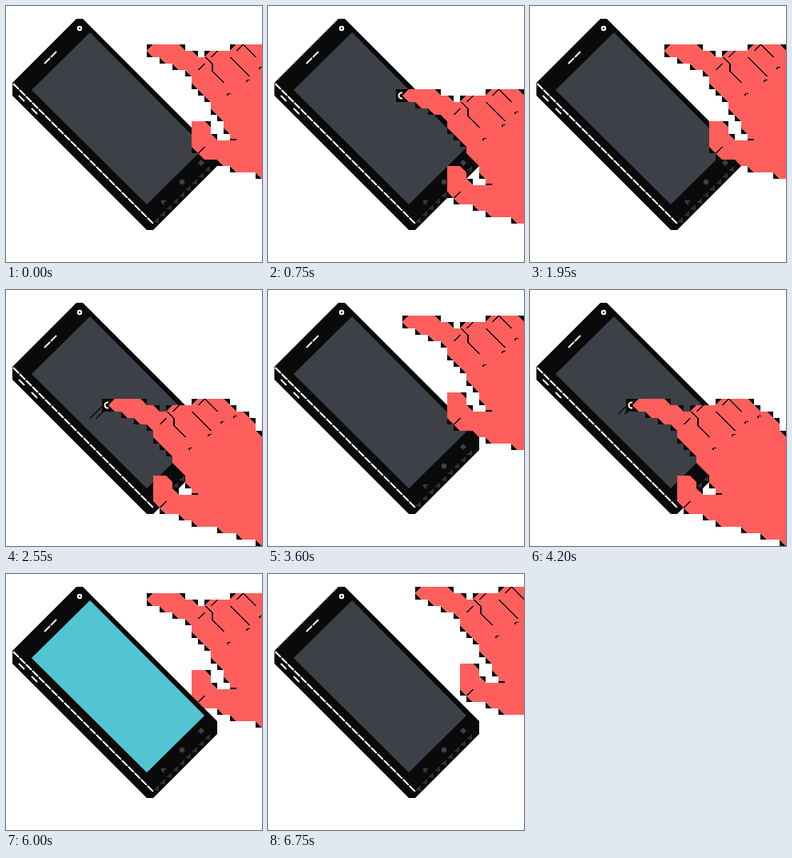
Write an HTML page with a canvas that moves like this. It is 320 px wide and 320 px high and loops after 6900 ms.

```html
<!DOCTYPE html>
<html lang="en">
<head>
<meta charset="utf-8">
<title>Swipe to unlock</title>
<style>
html, body { margin: 0; width: 100%; height: 100%; overflow: hidden; background: #fff; }
canvas { display: block; width: 320px; height: 320px; }
</style>
</head>
<body>
<canvas id="stage" width="320" height="320"></canvas>
<script>
const ctx = document.getElementById('stage').getContext('2d');
const STEP = 150, STEPS = 46, CELL = 8;
const BLACK = '#0a0a0a', GLASS = '#3d4047', TEAL = '#53c4d2', RED = '#ff5f5c', WHITE = '#fff';

function trace(points, closed) {
  ctx.beginPath();
  points.forEach(([x, y]) => ctx.lineTo(x, y));
  if (closed) ctx.closePath();
}
function poly(points, color) {
  trace(points, true);
  ctx.fillStyle = color;
  ctx.fill();
}
function line(x1, y1, x2, y2, color = BLACK) {
  trace([[x1, y1], [x2, y2]]);
  ctx.strokeStyle = color;
  ctx.lineWidth = 2;
  ctx.stroke();
}
function disc(x, y, r, color) {
  ctx.beginPath();
  ctx.arc(x, y, r, 0, Math.PI * 2);
  ctx.fillStyle = color;
  ctx.fill();
}
// Crisp thin stroke, one pixel row at a time.
function crease(x1, y1, x2, y2) {
  const n = Math.max(Math.abs(x2 - x1), Math.abs(y2 - y1));
  ctx.fillStyle = BLACK;
  for (let i = 0; i <= n; i++) {
    ctx.fillRect(Math.round(x1 + (x2 - x1) * i / n), Math.round(y1 + (y2 - y1) * i / n), 2, 1);
  }
}

// Joins key points by straight and 45 degree unit moves, in cells.
function walk(keys) {
  return keys.flatMap(([x, y], k) => {
    const [ex, ey] = keys[(k + 1) % keys.length];
    const dx = ex - x, dy = ey - y;
    const n = Math.max(Math.abs(dx), Math.abs(dy));
    const along = (d, i) => Math.sign(d) * Math.ceil(i * Math.abs(d) / n);
    return Array.from({ length: n }, (_, i) =>
      [(x + along(dx, i)) * CELL, (y + along(dy, i)) * CELL]);
  });
}

const HAND = walk([
  [0, 1], [1, 0], [5, 0], [6, 1], [7, 1], [8, 2], [9, 2], [10, 1], [13, 1], [14, 0],
  [18, 0], [20, 2], [21, 2], [23, 4], [23, 5], [27, 13], [27, 24],
  [15, 20], [14, 20], [10, 18], [9, 18], [7, 16], [7, 12], [9, 12],
  [10, 13], [10, 14], [11, 15], [13, 15], [13, 14], [12, 13], [12, 12],
  [10, 10], [10, 9], [7, 6], [7, 5], [1, 2]
]);

const SCREEN = [[105, 33], [248, 177], [176, 248], [32, 105]];

function drawPhone() {
  poly([[88, 16], [96, 16], [264, 184], [264, 200], [184, 280], [176, 280], [8, 112], [8, 96]], BLACK);
  poly(SCREEN, GLASS);

  ctx.setLineDash([10, 1.3]);
  line(9, 97, 184, 272, WHITE);
  ctx.setLineDash([]);
  for (const i of [0, 1]) {
    line(16 + 16 * i, 112 + 16 * i, 23 + 16 * i, 119 + 16 * i, WHITE);
    line(48 + 8 * i, 72 - 8 * i, 55 + 8 * i, 65 - 8 * i, WHITE);
  }

  disc(92, 28, 3.2, WHITE);
  disc(92, 28, 1.2, BLACK);

  poly([[244, 192], [248, 196], [244, 200], [240, 196]], GLASS);
  disc(220, 220, 3.2, GLASS);
  line(194, 244, 200, 244, GLASS);
  line(194, 244, 198, 248, GLASS);

  for (let i = 0; i < 9; i++) {
    const x = 248 - i * CELL, y = 200 + i * CELL;
    poly([[x, y + 6], [x + 7, y], [x + 7, y + 7]], '#303137');
  }
}

// Lights the cells lying at least `inset` inside the glass.
function drawLight(inset) {
  if (inset === 0) return poly(SCREEN, TEAL);
  ctx.save();
  trace(SCREEN, true);
  ctx.clip();
  ctx.fillStyle = TEAL;
  for (let y = 32; y < 248; y += CELL) {
    for (let x = 32; x < 248; x += CELL) {
      const sum = x + y + CELL, diff = y - x;
      if (sum >= 138 + inset * 0.85 && sum < 424 - inset && diff <= 72 - inset) {
        ctx.fillRect(x, y, CELL, CELL);
      }
    }
  }
  ctx.restore();
}

// Black half cells outside every sloped edge.
function drawEdge() {
  HAND.forEach(([x, y], i) => {
    const [ex, ey] = HAND[(i + 1) % HAND.length];
    const corner = ex - x === ey - y ? [ex, y] : [x, ey];
    poly([[x, y], corner, [ex, ey]], BLACK);
  });
}

function drawMark({ since, touch }) {
  ctx.fillStyle = BLACK;
  ctx.fillRect(-8, 0, 8, 16);
  if (since === 0) {
    line(4, -8, 4, 0);
    line(4, 16, 4, 24);
    line(-16, 9, -8, 9);
  } else if (since === 1) {
    const tail = 30 - 3 * touch;
    crease(-tail, tail, -8, 8);
    crease(8 - tail, tail, -8, 16);
  }
}

function drawHand(pose, lit) {
  const touching = pose.since < 3;
  ctx.save();
  ctx.translate(176 + pose.x, 48 + pose.y);
  if (touching) drawMark(pose);
  drawEdge();
  poly(HAND, RED);

  crease(64, 31, 71, 24);
  crease(73, 16, 81, 24);
  crease(81, 24, 81, 33);
  crease(81, 33, 95, 47);
  crease(80, 15, 87, 8);
  crease(104, 16, 127, 39);
  crease(112, 7, 119, 0);
  crease(120, 0, 135, 15);
  crease(64, 135, 71, 128);
  line(104, 119, 112, 119);
  for (const [x, y] of [[102, 62], [126, 45], [142, 29], [158, 22], [198, 101]]) {
    crease(x - 2, y + 1, x - 2, y);
    crease(x - 1, y - 1, x + 1, y - 1);
  }

  if (touching) {
    ctx.beginPath();
    ctx.arc(-1, 8, 3.5, Math.PI * 0.4, Math.PI * 1.6);
    ctx.strokeStyle = lit ? TEAL : WHITE;
    ctx.lineWidth = 2;
    ctx.stroke();
  }
  ctx.restore();
}

const TOUCHES = [3, 9, 16, 21, 27, 33];
const SWIPE = [[-64, 96], [-48, 88], [-8, 56]];
const UNLOCK = TOUCHES[5];
const snap = v => Math.round(v / CELL) * CELL;

// Touch, flick up, drift away, then arc down to the next touch.
function handPose(step) {
  if (step < TOUCHES[0]) step += STEPS;
  const touch = TOUCHES.findLastIndex(t => t <= step);
  const next = TOUCHES[touch + 1] ?? TOUCHES[0] + STEPS;
  const since = step - TOUCHES[touch];
  if (since < SWIPE.length) {
    const [x, y] = SWIPE[since];
    return { x, y, since, touch };
  }
  const reach = Math.min(4, (next - TOUCHES[touch]) / 2);
  const u = Math.max(0, 1 - (next - step) / reach);
  const restX = 2 * since - 14, restY = -8 - 2 * since;
  const x = snap(restX + (SWIPE[0][0] - restX) * u ** 1.5);
  const y = snap(restY + (SWIPE[0][1] - restY) * u);
  return { x, y, since, touch };
}

function draw(ms) {
  const step = Math.floor(ms / STEP) % STEPS;
  const inset = Math.max(0, 96 - 40 * (step - UNLOCK), 36 * (step - UNLOCK - 9));
  const lit = inset < 72;
  ctx.fillStyle = WHITE;
  ctx.fillRect(0, 0, 320, 320);
  drawPhone();
  if (lit) drawLight(inset);
  drawHand(handPose(step), lit);
}

const start = performance.now();
function tick() {
  draw(performance.now() - start);
  requestAnimationFrame(tick);
}
tick();
</script>
</body>
</html>
```
